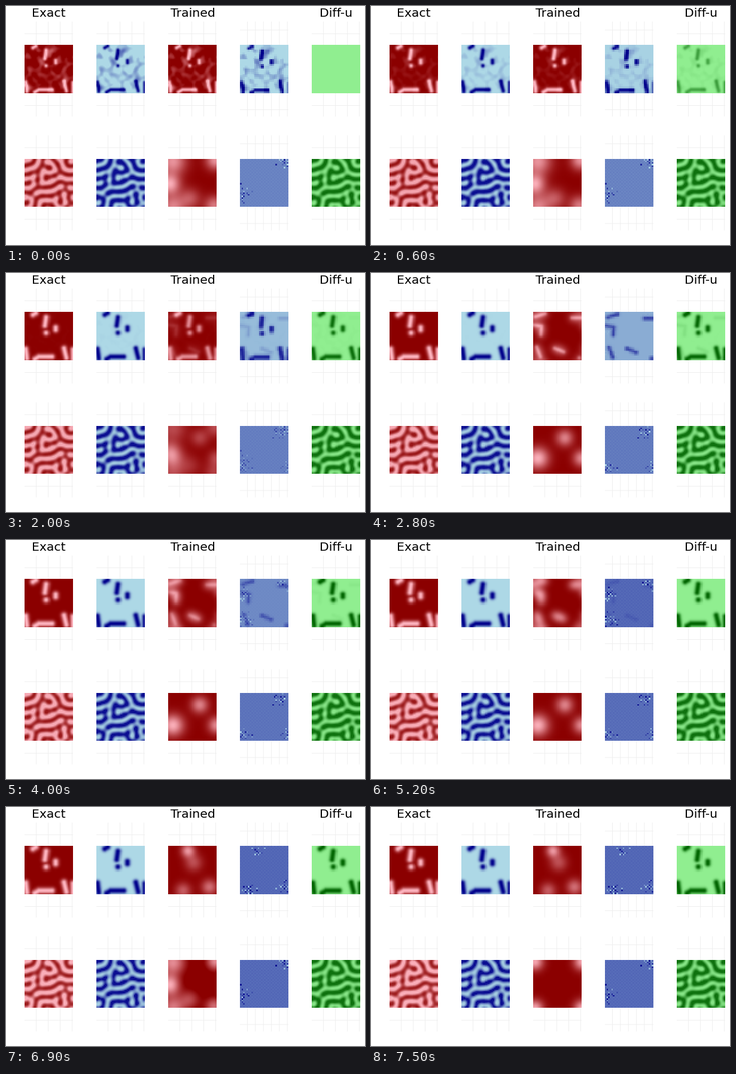
Recreate the animation shown at these times as a matplotlib script. Size 600x400 px, loop 7600 ms.

```python
import numpy as np
import matplotlib.pyplot as plt
from matplotlib.animation import FuncAnimation
from matplotlib.colors import LinearSegmentedColormap

W, H, DPI = 600, 400, 100
FRAMES, STEP_MS = 76, 100
SIDE, FINE, COARSE = 80, 40, 30
LEFT, PITCH, TOPS = 31.5, 120, (65.5, 256)

RED = LinearSegmentedColormap.from_list("red", ["darkred", "lightpink"])
BLUE = LinearSegmentedColormap.from_list("blue", ["lightblue", "darkblue"])
GREEN = LinearSegmentedColormap.from_list("green", ["lightgreen", "darkgreen"])

# Polylines in panel pixels, y down.
SPOTS = [
    [(14, 5), (19, 2)],
    [(36, 9), (34, 23)],
    [(36, 35)],
    [(51, 26), (51, 30)],
    [(2, 61), (4, 77)],
    [(17, 78), (24, 74), (45, 74)],
    [(65, 60), (69, 76)],
    [(80, 62), (80, 78)],
]
SQUIGGLES = [
    [(0, 22), (14, 24), (13, 38)],
    [(4, 8), (20, 3)],
    [(6, 58), (12, 74)],
    [(36, 60), (50, 66)],
    [(64, 10), (80, 10)],
    [(76, 76)],
]
MAZE_SEED = [
    [(50, 20), (30, 24), (30, 42), (46, 40), (42, 32)],
    [(0, 22), (16, 13), (27, 0)],
    [(36, 0), (44, 10)],
    [(60, 0), (66, 18), (80, 18)],
    [(20, 55), (42, 55), (60, 46)],
    [(0, 60), (12, 70)],
    [(66, 56), (66, 76)],
]


def grid(n):
    c = (np.arange(n) + .5) * SIDE / n
    return np.meshgrid(c, c)


def distance(strokes, n):
    x, y = grid(n)
    d = np.full((n, n), 1e3)
    for line in strokes:
        for (ax, ay), (bx, by) in zip(line, line[1:] or line):
            dx, dy = bx - ax, by - ay
            t = ((x - ax) * dx + (y - ay) * dy) / max(dx * dx + dy * dy, 1e-9)
            t = np.clip(t, 0, 1)
            d = np.minimum(d, np.hypot(x - ax - t * dx, y - ay - t * dy))
    return d


def blobs(items, n):
    """Sum of soft discs given as (x, y, radius, height)."""
    x, y = grid(n)
    return sum(h * np.exp(-((x - bx) ** 2 + (y - by) ** 2) / r ** 2)
               for bx, by, r, h in items)


def wave_numbers(n):
    k = np.fft.fftfreq(n, SIDE / n)
    return k[:, None] ** 2 + k[None, :] ** 2


def diffuse(field, sigma):
    """Periodic heat flow, rescaled to a peak of one."""
    decay = np.exp(-2 * (np.pi * sigma) ** 2 * wave_numbers(len(field)))
    out = np.fft.ifft2(np.fft.fft2(field) * decay).real
    return out / out.max()


def ease(f, start, end):
    t = np.clip((f - start) / (end - start), 0, 1)
    return t * t * (3 - 2 * t)


def mix(a, b, t):
    return a + (b - a) * t


def labyrinth(wave=14.5, dt=.25, r=.8, steps=50):
    """Let a stripe-forming flow grow a maze around the seed strokes."""
    d = distance(MAZE_SEED, FINE)
    noise = np.random.default_rng(8).normal(size=d.shape)
    u = np.cos(2 * np.pi * d / wave) * np.exp(-(d / wave) ** 2)
    u += .3 * diffuse(noise, 3)
    damp = 1 + dt * ((1 - wave_numbers(FINE) * wave ** 2) ** 2 - r)
    for _ in range(steps):
        u = np.fft.ifft2(np.fft.fft2(u - dt * u ** 3) / damp).real
    return np.clip(.56 + .56 * u, 0, 1)


def specks(centres, seed):
    """Checkered grain gathered around the given centres."""
    rng = np.random.default_rng(seed)
    mask = blobs([(x, y, 9, .65) for x, y in centres], COARSE)
    i, j = np.indices(mask.shape)
    sign = np.where((i + j) % 2, 1, -1)
    grain = sign * rng.uniform(.1, .45, mask.shape)
    return np.where(rng.random(mask.shape) < mask, grain, .015 * sign)


def haze():
    noise = np.random.default_rng(5).normal(size=(FINE, FINE))
    return .5 * np.clip(diffuse(noise, 3.2), 0, 1)


def coarsen(field):
    idx = np.arange(COARSE) * FINE // COARSE
    return field[np.ix_(idx, idx)]


SPOT_DIST = distance(SPOTS, FINE)
HAZE = haze()
MAZE = labyrinth()
TRACE = np.exp(-(distance(SQUIGGLES, FINE) / 3.5) ** 2)
SOFT = .85 * diffuse(TRACE, 6)
LATE = blobs([(33, 8, 11, .8), (42, 28, 14, .42),
              (25, 74, 13, .5), (68, 68, 13, .6)], FINE)

# Smooth states of the lower fit.
SLOPE = blobs([(3, 42, 17, .9), (8, 4, 22, .8), (78, 2, 16, .8),
               (8, 80, 20, .7), (76, 78, 16, .65), (36, 66, 17, .45)], FINE)
PAIR = blobs([(52, 20, 14, .7), (8, 54, 18, .95), (80, 54, 14, .75)], FINE)
CORNERS = blobs([(x, y, 14, .9) for x in (3, 81) for y in (3, 81)], FINE)

GRAIN_MID = specks([(6, 24), (10, 66), (74, 8)], 2)
GRAIN_LATE = specks([(30, 6), (74, 70), (14, 77)], 3)
GRAIN_EDGE = specks([(76, 3), (3, 60)], 4)
GRAIN_PAIR = specks([(66, 11), (79, 72), (6, 70)], 6)


def spots(f, power=2.2, wide=1.0):
    w = mix(4.8, 2.9, np.exp(-f / 16)) * wide
    return np.exp(-(SPOT_DIST / w) ** power) + HAZE * np.exp(-f / 7)


def chain(states, f):
    """Move through the states at the moments the lower fit restarts."""
    out = states[0]
    for state, start in zip(states[1:], (18, 58, 70)):
        out = mix(out, state, ease(f, start, start + 4))
    return out


def panels(f):
    """The ten fields of one moment, row by row."""
    u, v = spots(f, 2, 1.1), spots(f)
    cut, late, blur = ease(f, 18, 24), ease(f, 58, 63), ease(f, 24, 54)

    mid_u = mix(.65 * SOFT + .4 * TRACE, SOFT, blur)
    fit_u = mix(mix(u, mid_u, cut), LATE, late)

    base = np.interp(f, [0, 12, 28, 52], [0, .05, .2, .52])
    mid_v = mix(.5, .06, blur) * coarsen(TRACE) + blur * GRAIN_MID
    fit_v = base + mix(mix(.95 * coarsen(v), mid_v, cut), GRAIN_LATE, late)

    diff = (1 - np.exp(-f / 8)) * (v + .1 * cut * (1 - blur) * TRACE)

    age = f / (FRAMES - 1)
    maze_u = mix(.1, .16, age) + .8 * MAZE
    maze_v = .05 + mix(.88, .72, age) * MAZE + .16 * age * MAZE ** 8
    low_u = chain([SLOPE, PAIR, 1.2 * SLOPE - .2, CORNERS], f)
    low_v = (mix(.39, .51, ease(f, 0, 69))
             + chain([GRAIN_EDGE, GRAIN_PAIR, GRAIN_EDGE], f))
    return [u, v, fit_u, fit_v, diff,
            maze_u, maze_v, low_u, low_v, .06 + .84 * MAZE]


fig = plt.figure(figsize=(W / DPI, H / DPI), dpi=DPI, facecolor="white")
ax = fig.add_axes([0, 0, 1, 1])


def guides(x0, y0, n):
    """Faint tick lines behind a panel of n cells."""
    cell, mid = SIDE / n, y0 + SIDE / 2
    gap = 10 if n == FINE else 5
    style = dict(color="#eeeeee", lw=.65, zorder=0, snap=False)
    for tick in range(gap, n + 1, gap):
        x = x0 + (tick - .5) * cell
        ax.plot([x, x], [mid - 79, mid + 79], **style)
    for tick in (-10, n + 10):
        y = mid - (tick - (n + 1) / 2) * cell
        ax.plot([x0, x0 + SIDE], [y, y], **style)


images = []
for y0 in TOPS:
    for col, cmap in enumerate((RED, BLUE, RED, BLUE, GREEN)):
        x0 = LEFT + col * PITCH
        n = COARSE if col == 3 else FINE
        guides(x0, y0, n)
        box = (np.floor(x0), np.ceil(x0 + SIDE), np.ceil(y0 + SIDE), np.floor(y0))
        images.append(ax.imshow(
            np.zeros((n, n)), cmap=cmap, vmin=0, vmax=1, aspect="auto",
            interpolation="nearest", zorder=2, extent=box))

for x, label in ((71, "Exact"), (312.8, "Trained"), (551.5, "Diff-u")):
    ax.text(x, 18, label, ha="center", va="baseline",
            fontsize=14.7, family="DejaVu Sans", color="black")

ax.set_xlim(0, W)
ax.set_ylim(H, 0)
ax.axis("off")


def draw(f):
    for image, field in zip(images, panels(f)):
        image.set_data(np.clip(field, 0, 1))
    return images


anim = FuncAnimation(fig, draw, frames=FRAMES, interval=STEP_MS, repeat=True)
plt.show()
```
